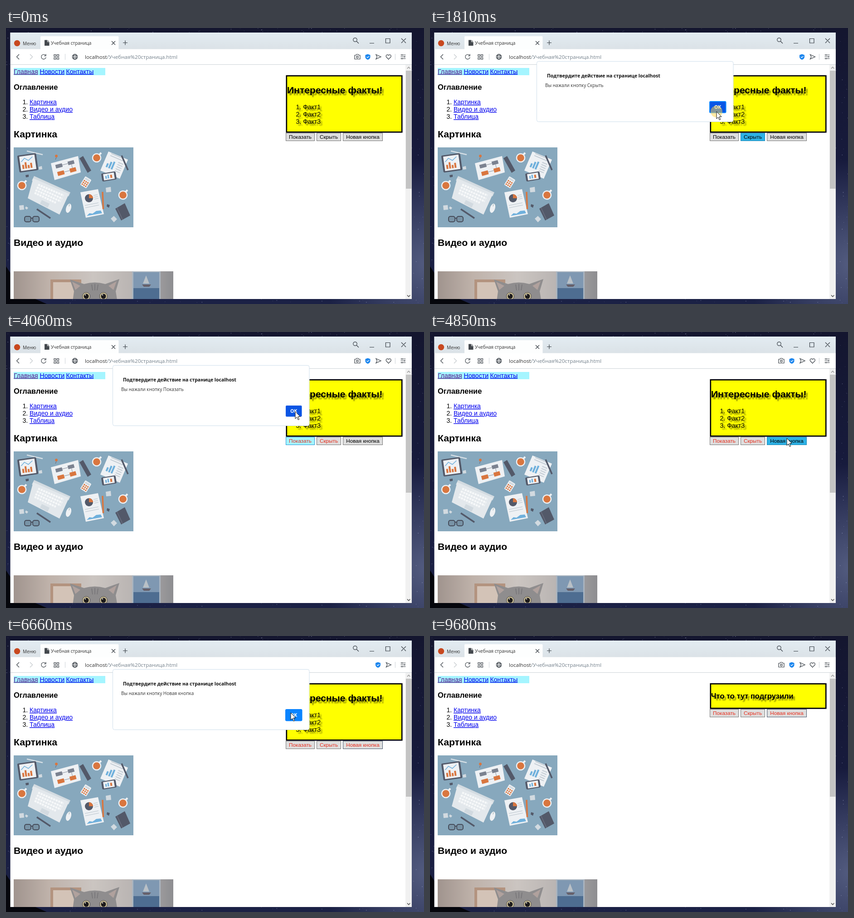
An HTML page that plays this animation: 922x608 px, repeating every 9760 ms.

```html
<!DOCTYPE html>
<html lang="ru">
<head>
<meta charset="utf-8">
<title>Учебная страница</title>
<style>
html, body { margin: 0; width: 100%; height: 100%; overflow: hidden; background: #13153a; }
svg { display: block; width: 922px; height: 608px; }
text { font-family: "Liberation Sans", Arial, sans-serif; font-size: 14.08px; white-space: pre; }
.ui { font-family: "Open Sans", "Noto Sans", sans-serif; font-size: 10px; fill: #333; }
.bold { font-size: 10.5px; font-weight: 700; fill: #111; }
.h2 { font-size: 21.12px; font-weight: bold; }
.h3 { font-size: 16.47px; font-weight: bold; }
.link { fill: #00e; text-decoration: underline; }
.seen { fill: #551a8b; }
.line { fill: none; stroke: #3a4148; stroke-width: 1.2; }
.shade { filter: drop-shadow(4.4px 4.4px 1.3px #0007); }
.frame { fill: #ff0; stroke: #000; stroke-width: 2.7; }
.btn rect { fill: #dedede; stroke: #777; }
.btn text { font-size: 11.73px; text-anchor: middle; }
.red text { fill: #e8301f; }
.focus rect { stroke: #46566c; }
.hover rect { fill: #a5f5ff; stroke: #2796d6; }
.active rect { fill: #2db2e6; stroke: #1c86b4; }
.w { fill: #eef1f4; }
.d { fill: #535969; }
.o { fill: #d9763f; }
.b { fill: #6fb0dc; }
.g { fill: #d2dae0; }
</style>
</head>
<body>
<svg viewBox="0 0 922 608">
  <defs>
    <linearGradient id="sky" x2="0" y2="1">
      <stop offset="0" stop-color="#14162f"/><stop offset=".6" stop-color="#181c40"/><stop offset="1" stop-color="#1b2145"/>
    </linearGradient>
    <radialGradient id="glow" gradientUnits="userSpaceOnUse" cx="930" cy="520" r="230">
      <stop offset="0" stop-color="#535c80"/><stop offset="1" stop-color="#535c80" stop-opacity="0"/>
    </radialGradient>
    <linearGradient id="bar" x2="0" y2="1">
      <stop offset="0" stop-color="#e3ecf2"/><stop offset="1" stop-color="#dbe2e7"/>
    </linearGradient>
    <linearGradient id="wall">
      <stop offset="0" stop-color="#a0948e"/><stop offset=".22" stop-color="#bfb2aa"/>
      <stop offset=".5" stop-color="#cbc5c1"/><stop offset=".75" stop-color="#b9b4b2"/><stop offset="1" stop-color="#8d8d91"/>
    </linearGradient>
    <clipPath id="pic"><rect x="17" y="263" width="264" height="176"/></clipPath>
    <clipPath id="photo"><rect x="17" y="536" width="352" height="61"/></clipPath>
    <g id="cup"><path d="M5-6l5-5" stroke="#eef1f4" stroke-width="4"/><circle r="10.3" class="w"/><circle r="7.8" class="o"/></g>
  </defs>

  <rect width="922" height="608" fill="url(#sky)"/>
  <rect width="922" height="608" fill="url(#glow)"/>
  <path id="stars" fill="#c6cbea" opacity=".45"/>
  <path d="M0 525l10 15v57h55l25 11H0Z" fill="#05060c"/>

  <!-- window -->
  <rect x="9.500" y="10" width="885.500" height="587" fill="#fff"/>
  <rect x="9.500" y="10" width="885.500" height="36.500" fill="url(#bar)"/>
  <path d="M76 47V20q0-2 2-2H246.500q2 0 2 2V47Z" fill="#fdfefe"/>
  <path d="M10 80.500H895" stroke="#cdd3d8"/>
  <circle cx="24.500" cy="33.500" r="6.700" fill="#c8481f"/>
  <text class="ui" x="37" y="37.500">Меню</text>
  <path d="M85 26.500h6.500l4 4V39H85Z" fill="#43484d"/><path d="M91.500 26.500v4h4" stroke="#fff" fill="none"/>
  <text class="ui" x="99" y="37">Учебная страница</text>
  <g class="line">
    <path d="M233 29l8 8m0-8l-8 8M258 32.500h10m-5-5v10"/>
    <circle cx="770" cy="26" r="4.200"/><path d="M773 29l5 5"/>
    <path d="M802 33.500h10M837.500 23.500h9.500v9.500h-9.500ZM872 23l10 10m0-10l-10 10"/>
    <path d="M29 58l-5.500 5.500 5.500 5.500"/><path d="M53 58l5.500 5.500-5.500 5.500" stroke="#c3c8cc"/>
    <path d="M87 60a5.200 5.200 0 1 0 1.200 4.500M88 57.500v4h-4"/>
    <path d="M106 58.500h4v4h-4ZM112.500 58.500h4v4h-4ZM106 65h4v4h-4ZM112.500 65h4v4h-4Z"/>
    <path d="M130.500 57v13M858.500 57v13" stroke="#d4d8dc"/>
    <circle cx="152" cy="63.500" r="5.600"/><ellipse cx="152" cy="63.500" rx="2.600" ry="5.600"/><path d="M146.500 61.500h11m-11 4h11"/>
    <path d="M870.500 59.500h11M870.500 63.500h11M870.500 67.500h11M873.500 58v3M879 62v3M873.500 66v3"/>
  </g>
  <text class="ui" x="174" y="67.500" style="font-size:11.6px">localhost<tspan fill="#75828d">/Учебная%20страница.html</tspan></text>
  <g id="extra" class="line">
    <path d="M769 60h3l1-2h4l1 2h3v8.500h-12Z"/><circle cx="775" cy="64" r="2.200"/>
    <path d="M843.800 69l-4.800-5c-2.600-3 2-7.500 4.800-3.600c2.800-3.900 7.400.6 4.800 3.600Z"/>
  </g>
  <g id="badges">
    <path d="M798 57.500l5.500 2v5q-1 4-5.500 5.500q-4.500-1.500-5.500-5.500v-5Z" fill="#1c86ee"/>
    <path d="M795.500 63.500l2 2 3.500-3.500" stroke="#fff" stroke-width="1.200" fill="none"/>
    <path class="line" d="M816 58.500l11 5-11 5 2.500-5Z"/>
  </g>
  <rect x="881" y="81" width="14" height="516" fill="#f1f1f1"/>
  <rect x="882" y="94" width="12.500" height="260" fill="#c4c4c4"/>
  <path d="M885 89.500l3.200-3.500 3.200 3.500" fill="none" stroke="#9a9a9a" stroke-width="1.500"/>
  <path d="M885 588.500l3.200 3.500 3.200-3.500" fill="none" stroke="#505050" stroke-width="1.500"/>

  <!-- page -->
  <rect x="17" y="88" width="202" height="16" fill="#a5f5ff"/>
  <text class="link seen" x="17" y="100.500">Главная</text>
  <text class="link" x="74.500" y="100.500">Новости</text>
  <text class="link" x="132.500" y="100.500">Контакты</text>
  <text class="h3" x="17" y="135.500">Оглавление</text>
  <text x="36.500" y="168">1.</text><text class="link" x="52" y="168">Картинка</text>
  <text x="36.500" y="184">2.</text><text class="link" x="52" y="184">Видео и аудио</text>
  <text x="36.500" y="200">3.</text><text class="link" x="52" y="200">Таблица</text>
  <text class="h2" x="17" y="240.500">Картинка</text>
  <text class="h2" x="17" y="479.500">Видео и аудио</text>

  <!-- desk picture -->
  <g clip-path="url(#pic)">
    <rect x="17" y="263" width="264" height="176" fill="#87a8bd"/>
    <path d="M46 271l35 8" stroke="#d5dee5" stroke-width="2.500"/>
    <g transform="translate(48 297) rotate(-8)">
      <rect x="-21" y="-19" width="42" height="38" rx="3" class="d"/><rect x="-17" y="-16" width="34" height="32" class="w"/>
      <path class="o" d="M-13 12V3h4v9ZM-7 12V-2h4v14ZM-1 12V5h4v7ZM5 12V1h4v11Z"/>
      <path d="M-14-4l8-7 8 6 10-7" stroke="#6fb0dc" stroke-width="1.500" fill="none"/>
    </g>
    <circle cx="111" cy="282" r="3" class="o"/><path d="M111 285l-2 5" stroke="#667"/>
    <path class="w" d="M99 298l60-16 6 36-58 17Z"/>
    <g transform="translate(132 308) rotate(-15)">
      <path fill="#7b8290" d="M-21-12h15v8h-15ZM7-12h14v8H7Z"/><path class="o" d="M-21 4h15v9h-15ZM7 4h14v9H7Z"/>
      <path fill="none" stroke="#8a919d" d="M-6-8H7M14-4v8M7 8H-6"/>
    </g>
    <path class="d" d="M162 287l8-5 18 32-8 5Z"/>
    <use href="#cup" x="200" y="286"/>
    <path class="w" d="M226 272l43 18-18 42-43-18Z"/>
    <g transform="translate(239 301) rotate(23)">
      <path class="b" d="M-16 12V3h4v9ZM-10 12V-3h4v15ZM-4 12V-6h4v18Z"/>
      <path d="M-16-20h30M-16-15h30M6-8h12M6-3h12M6 2h12M6 7h12M6 12h12" stroke="#c3ccd4" stroke-width="2"/>
    </g>
    <path d="M255 281l14 32" stroke="#535969" stroke-width="3.500"/>
    <g transform="translate(227 327) rotate(-9)">
      <rect x="-16" y="-9" width="32" height="18" rx="3" class="d"/><rect x="-12" y="-7" width="24" height="14" class="w"/>
      <path class="b" d="M-8 4V-2h3v6ZM-3 4v-8H0v8Z"/><path class="o" d="M3 4v-7h4v7Z"/>
    </g>
    <use href="#cup" x="35" y="347"/>
    <path fill="#d3dbe1" d="M62 326l80 36-4 9-81-35Z"/>
    <path fill="#e3e8ec" d="M60 331l79 34-21 46-70-36Z"/>
    <path d="M71 345l56 24M68 351l56 25M65 357l56 25M63 363l47 22" stroke="#f6f8f9" stroke-width="4.500" stroke-dasharray="4.500 1.500"/>
    <path class="g" d="M79 379l17 8-4 9-17-9Z"/>
    <ellipse cx="138" cy="397" rx="5.500" ry="10.500" class="w" transform="rotate(18 138 397)"/><path d="M140 388l-1 5" stroke="#9aa"/>
    <path d="M68 399l30 20" stroke="#535969" stroke-width="3.500"/>
    <g fill="#7893a6" stroke="#464c5a" stroke-width="2"><rect x="41" y="415" width="14" height="12" rx="4"/><rect x="59" y="415" width="14" height="12" rx="4"/><path d="M55 419h4"/></g>
    <path class="g" d="M29 391l10-1 1 10-10 1ZM44 393l5 3-3 4-4-3ZM72 306l7-2 1 7-7 1ZM220 352l11-2 1 11-11 1ZM231 420l7-6 7 7-7 7Z"/>
    <path class="d" d="M43 324l7-1v5l-6 1ZM223 388l6 2-2 6-5-3Z"/>
    <g transform="translate(176 340) rotate(32)">
      <rect x="-8" y="-11" width="16" height="22" rx="2" class="w"/><rect x="-6" y="-9" width="12" height="4" class="g"/>
      <path d="M-6-1.500H6M-6 3H6M-6 7.500H6" stroke="#d9763f" stroke-width="3" stroke-dasharray="3 1.500"/>
    </g>
    <path class="w" d="M164 362l39-7 13 55-40 8Z"/>
    <circle cx="183" cy="375" r="9" class="d"/><path class="o" d="M183 375v-9a9 9 0 0 1 9 9Z"/>
    <path d="M193 369l9-2M194 373l9-2M195 377l9-2M174 391l30-6M175 396l30-6" stroke="#c9d1d8" stroke-width="1.500"/>
    <path class="b" d="M178 414l6-6 7 1 8-6 10-1 3 6Z"/>
    <path d="M213 361l1.500 38" stroke="#d9763f" stroke-width="3.500"/>
    <use href="#cup" x="258" y="368"/>
    <path d="M241 398l21-12 12 27-20 11Z" fill="#535969"/><path d="M245 396l12 26" stroke="#6b7080" stroke-width="1.500"/>
  </g>

  <!-- photo -->
  <g clip-path="url(#photo)">
    <rect x="17" y="536" width="352" height="61" fill="url(#wall)"/>
    <rect x="98" y="554" width="68" height="50" fill="#b3937f"/><rect x="104" y="560" width="56" height="44" fill="#d3c3b7"/>
    <rect x="278" y="536" width="63" height="61" fill="#a9b4bf"/>
    <rect x="281" y="538" width="57" height="36" fill="#7f98b2"/><rect x="281" y="573" width="57" height="24" fill="#4e6d91"/>
    <path d="M309 545l7 18h-14Z" fill="#b9c0c6"/><path d="M300 565h20l-4 5h-12Z" fill="#66606a"/>
    <path d="M141 554l31 10q24-7 47 0l31-11-8 27 5 30H146l4-30Z" fill="#8f8d8e"/>
    <path d="M146 559l18 9-11 9ZM244 558l-18 10 11 9Z" fill="#b0a19d"/>
    <path d="M189 565l2 13M196 564v14M203 565l-2 13" stroke="#7b797c" stroke-width="2"/>
    <g fill="#c9bd95" stroke="#4d4a4a"><circle cx="177" cy="591" r="8.500"/><circle cx="215" cy="591" r="8.500"/></g>
    <circle cx="177" cy="591" r="5.500" fill="#1d1b1c"/><circle cx="215" cy="591" r="5.500" fill="#1d1b1c"/>
    <path d="M174 588h2M212 588h2" stroke="#fff" stroke-width="2"/>
  </g>

  <!-- facts -->
  <g id="full">
    <rect class="frame" x="618.800" y="105.300" width="254.500" height="124"/>
    <g class="shade">
      <text class="h2" x="620" y="143.500">Интересные факты!</text>
      <text x="639.500" y="178.500">1.</text><text x="655" y="178.500">Факт1</text>
      <text x="639.500" y="194.500">2.</text><text x="655" y="194.500">Факт2</text>
      <text x="639.500" y="210.500">3.</text><text x="655" y="210.500">Факт3</text>
    </g>
  </g>
  <g id="short">
    <rect class="frame" x="618.800" y="105.300" width="254.500" height="54"/>
    <text class="h3 shade" x="620" y="138">Что то тут подгрузили</text>
  </g>
  <g id="row">
    <g id="show"><rect x="617.500" y="231.500" width="63" height="17"/><text x="649" y="244">Показать</text></g>
    <g id="hide"><rect x="685.500" y="231.500" width="53" height="17"/><text x="712" y="244">Скрыть</text></g>
    <g id="make"><rect x="743.500" y="231.500" width="87" height="17"/><text x="787" y="244">Новая кнопка</text></g>
  </g>

  <g id="dialog">
    <rect x="235.500" y="73.500" width="433.500" height="133" rx="4" fill="#fff" stroke="#cfdfec"/>
    <text class="ui bold" x="258" y="108.500">Подтвердите действие на странице localhost</text>
    <text class="ui" x="254" y="130" id="note"></text>
    <rect id="ok" x="617" y="162" width="35.500" height="24.500" rx="2" stroke-width="2"/>
    <text class="ui bold" x="634.700" y="178" text-anchor="middle" style="fill:#fff">OK</text>
  </g>

  <circle id="dot" r="13" fill="#ffd54a" opacity=".5"/>
  <path id="cursor" d="M0 0V16l3.700-3.500 2.600 6 2.400-1-2.600-6H11Z" fill="#fff" stroke="#111"/>
</svg>
<script>
const LOOP = 9760;
const el = id => document.getElementById(id);

// cursor tip: time, x, y
const path = [
  [70, 845, 612], [820, 712, 234], [1240, 712, 234], [1660, 632, 184],
  [2060, 632, 184], [2440, 666, 124], [2650, 655, 114], [2990, 655, 114],
  [3310, 638, 175], [4080, 638, 175], [4660, 787, 234], [5040, 787, 234],
  [5400, 592, 178], [5500, 592, 178], [5720, 622, 177], [5870, 625, 174],
  [6340, 625, 174], [6660, 628, 169], [7200, 628, 170], [7500, 624, 173],
  [8640, 624, 173], [9320, 845, 612]
];
// spans: start, end
const clicks = [[890, 1070], [1810, 1980], [2750, 2910], [3985, 4055], [4690, 4850], [6190, 6340]];
const busy = [[1070, 1980], [2870, 4060], [5020, 7200]];
const alerts = [
  [1070, 1980, 'Скрыть'], [2870, 4060, 'Показать'],
  [5020, 6340, 'Новая кнопка'], [6400, 7200, 'Новая кнопка']
];
// facts box: start, visible variant, shift of the button row
const boxes = [[0, 'full', 0], [1980, '', -127], [4060, 'full', 0], [7200, 'short', -70]];
const looks = {
  hide: [[0, ''], [760, 'hover'], [980, 'active'], [1980, 'red focus'], [2790, 'red']],
  show: [[0, ''], [2540, 'hover'], [2790, 'active'], [4060, 'red hover'], [4300, 'red'], [7400, 'red hover'], [8740, 'red']],
  make: [[0, ''], [4580, 'hover'], [4850, 'active'], [6340, 'red focus']]
};

const last = (list, t) => list.filter(s => s[0] <= t).pop();
const within = (list, t) => list.some(([a, b]) => t >= a && t < b);
const clamp = v => Math.max(0, Math.min(1, v));
const set = (id, name, value) => el(id).setAttribute(name, value);
const move = (id, x, y) => set(id, 'transform', `translate(${x} ${y})`);
const toggle = (id, on) => el(id).style.display = on ? '' : 'none';

function tip(t) {
  const i = path.findIndex(p => p[0] > t);
  if (i < 1) return path[0].slice(1);
  const [a, x, y] = path[i - 1], [b, u, v] = path[i];
  const k = (t - a) / (b - a), e = k * k * (3 - 2 * k);
  return [x + (u - x) * e, y + (v - y) * e];
}

function drawPage(t) {
  const [, box, shift] = last(boxes, t);
  toggle('full', box === 'full');
  toggle('short', box === 'short');
  move('row', 0, shift);
  for (const id in looks) set(id, 'class', 'btn ' + last(looks[id], t)[1]);
  const open = within(busy, t);
  toggle('extra', !open);
  move('badges', open ? 22.5 : 0, 0);
}

function drawAlert(t, x, y, pressed) {
  const [from, to, name] = last(alerts, t) ?? [LOOP, LOOP, ''];
  const alpha = clamp(Math.min((t - from) / 240, (to + 190 - t) / 120));
  toggle('dialog', alpha > 0);
  set('dialog', 'opacity', alpha);
  move('dialog', 0, -7 * (1 - alpha));
  el('note').textContent = 'Вы нажали кнопку ' + name;
  const over = t < to && x > 616 && x < 653 && y > 161 && y < 187;
  set('ok', 'fill', over && !pressed ? '#0a84ff' : '#0a55e4');
  set('ok', 'stroke', over ? '#0a84ff' : 'none');
}

function draw(t) {
  const [x, y] = tip(t), pressed = within(clicks, t);
  move('cursor', x, y);
  move('dot', x, y);
  toggle('dot', pressed);
  drawPage(t);
  drawAlert(t, x, y, pressed);
}

let seed = 7;
const rnd = () => (seed = seed * 16807 % 2147483647) / 2147483647;
let stars = '';
for (let i = 0; i < 1500; i++) {
  const s = (.5 + rnd() * .9).toFixed(1);
  stars += `M${(rnd() * 922).toFixed(1)} ${(rnd() * 608).toFixed(1)}h${s}v${s}h-${s}Z`;
}
set('stars', 'd', stars);

let start;
function tick(now) {
  start ??= now;
  draw((now - start) % LOOP);
  requestAnimationFrame(tick);
}
draw(0);
requestAnimationFrame(tick);
</script>
</body>
</html>
```
